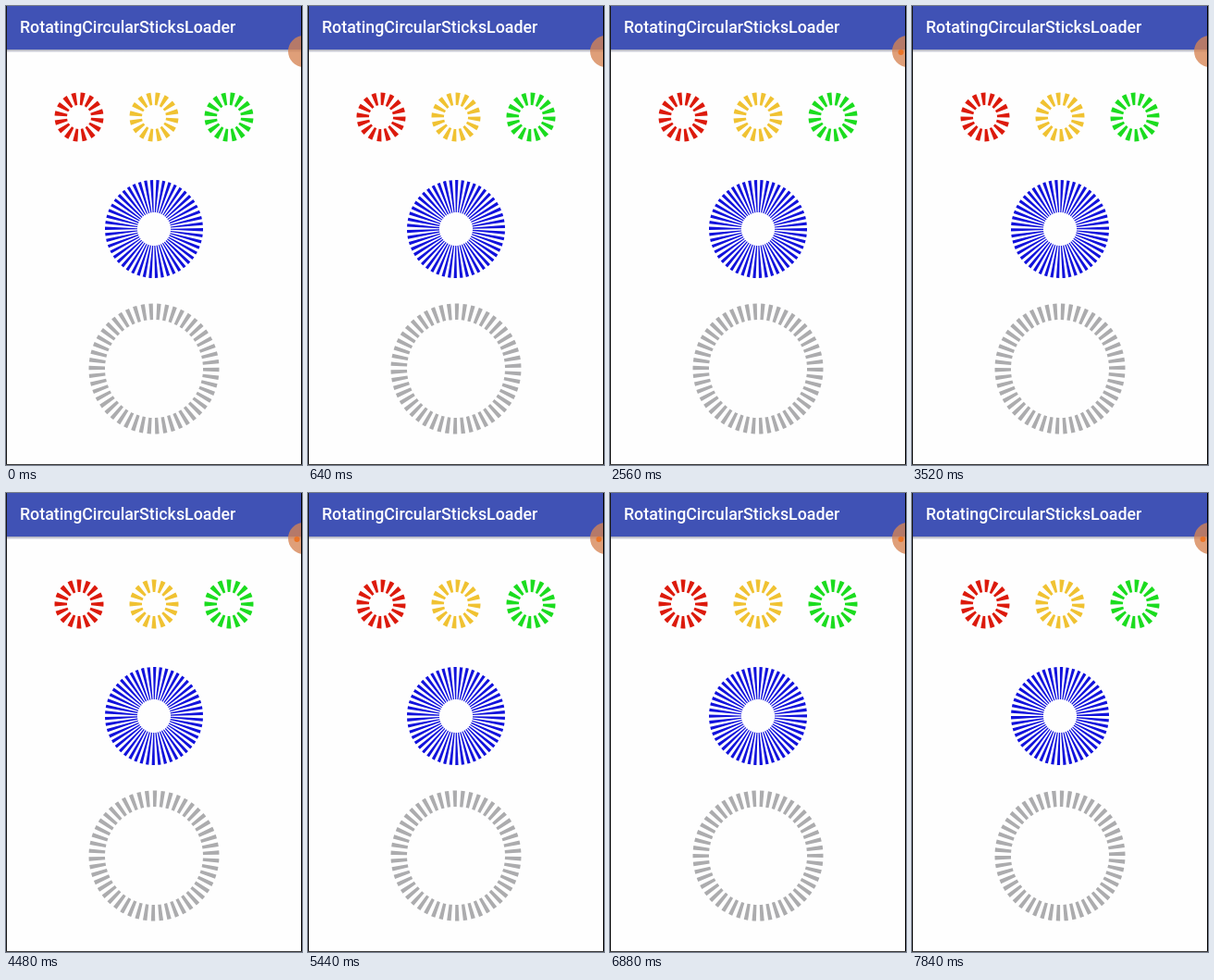
Recreate the animation shown at these times as an HTML page with a canvas. Size 320 px wide and 496 px high, loop 8 s.

```html
<!DOCTYPE html>
<html lang="en">
<head>
<meta charset="utf-8">
<title>RotatingCircularSticksLoader</title>
<style>
  html, body { margin: 0; width: 100%; height: 100%; overflow: hidden; background: #fff; }
  canvas { display: block; width: 320px; height: 496px; }
</style>
</head>
<body>
<canvas id="stage" width="320" height="496"></canvas>
<script>
const ctx = document.getElementById('stage').getContext('2d');
const LOOP = 8000, STEP = 160, TURN = 12800;
const START = 71; // degrees

const loaders = [
  { x: 79, y: 120, outer: 26.5, inner: 13, sticks: 16, color: '#dc1a0c' },
  { x: 160, y: 120, outer: 26.5, inner: 13, sticks: 16, color: '#f0c232' },
  { x: 241, y: 120, outer: 26.5, inner: 13, sticks: 16, color: '#1bdc1f' },
  { x: 160, y: 241, outer: 53, inner: 18, sticks: 50, color: '#1212dc' },
  { x: 160, y: 392, outer: 70.5, inner: 53, sticks: 50, color: '#acacae' }
];

function rect(x, y, w, h, color) {
  ctx.fillStyle = color;
  ctx.fillRect(x, y, w, h);
}

function disc(x, y, r, color) {
  ctx.fillStyle = color;
  ctx.beginPath();
  ctx.arc(x, y, r, 0, Math.PI * 2);
  ctx.fill();
}

function drawLoader({ x, y, outer, inner, sticks, color }, angle) {
  const pitch = Math.PI * 2 / sticks;
  ctx.fillStyle = color;
  ctx.beginPath();
  for (let i = 0; i < sticks; i++) {
    const from = angle + i * pitch;
    const to = from + pitch / 2;
    ctx.moveTo(x + outer * Math.cos(from), y + outer * Math.sin(from));
    ctx.arc(x, y, outer, from, to);
    ctx.arc(x, y, inner, to, from, true);
    ctx.closePath();
  }
  ctx.fill();
}

function drawBar() {
  const shadow = ctx.createLinearGradient(0, 47, 0, 50.5);
  shadow.addColorStop(0, '#a2a4b6');
  shadow.addColorStop(1, '#fefefe');
  rect(0, 47, 320, 4, shadow);
  rect(0, 0, 320, 47, '#4052b5');
  ctx.fillStyle = '#fff';
  ctx.font = '500 17.8px Roboto, sans-serif';
  ctx.textBaseline = 'alphabetic';
  ctx.fillText('RotatingCircularSticksLoader', 15, 29);
}

function drawBubble(t) {
  disc(322, 49, 17, 'rgba(214, 132, 84, 0.78)');
  const lit = t >= 2000 && (t < 3200 || t >= 4200);
  if (lit) disc(314.5, 50, 3, '#ea7428');
}

function drawFrame() {
  rect(0, 0, 1, 496, '#161616');
  rect(319, 0, 1, 496, '#000');
  rect(0, 495, 320, 1, '#3c3c3c');
}

function draw(t) {
  rect(0, 0, 320, 496, '#fefefe');
  drawBar();
  const angle = (START + t / TURN * 360) * Math.PI / 180;
  loaders.forEach(loader => drawLoader(loader, angle));
  drawBubble(t);
  drawFrame();
}

const began = performance.now();
function tick() {
  const t = (performance.now() - began) % LOOP;
  draw(Math.floor(t / STEP) * STEP);
  requestAnimationFrame(tick);
}
tick();
</script>
</body>
</html>
```
